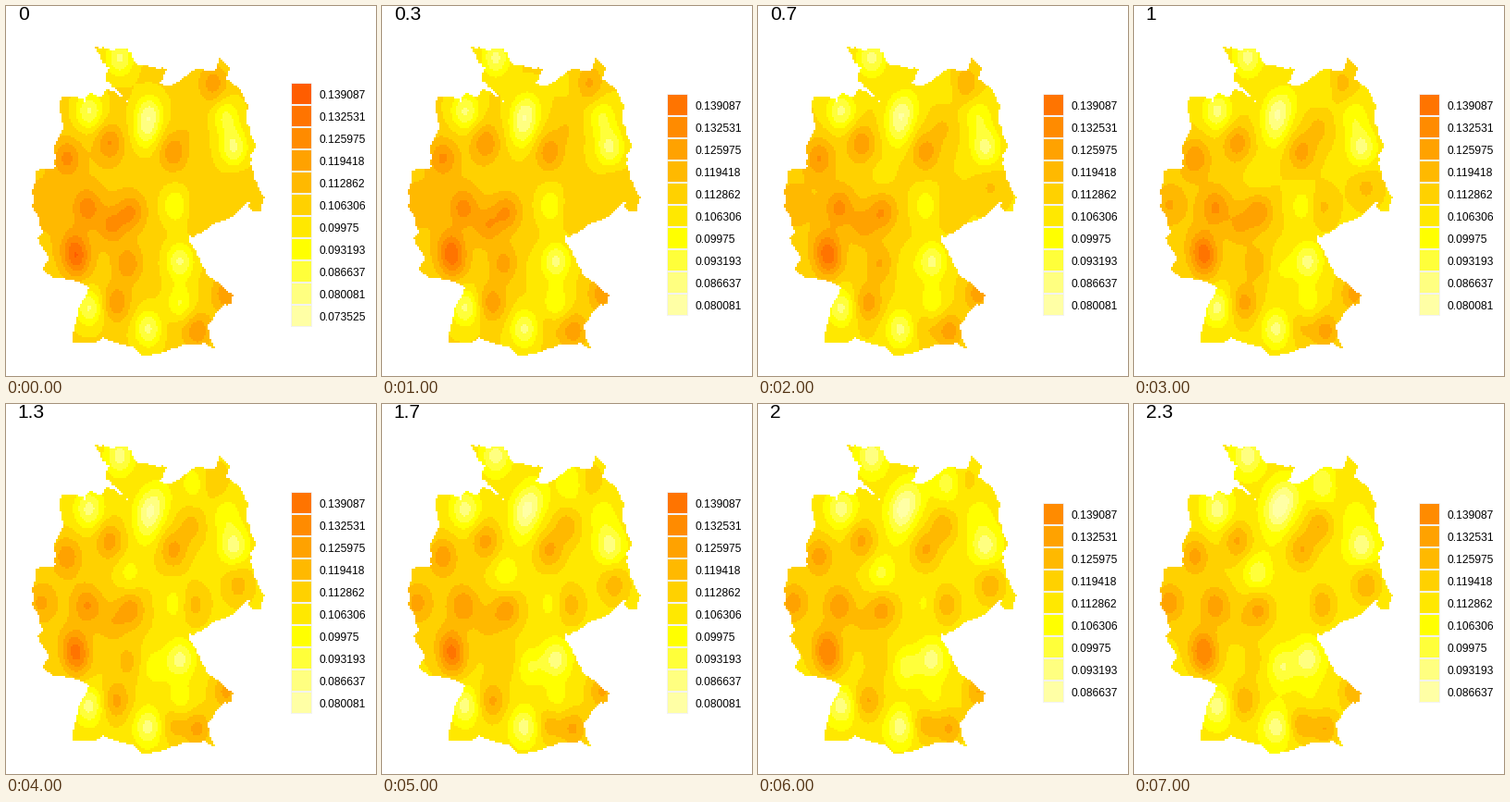
Write a matplotlib script that moves like this. It is 400 px wide and 400 px high and loops after 8000 ms.

```python
import numpy as np
import matplotlib.pyplot as plt
from matplotlib.animation import FuncAnimation
from matplotlib.patches import Rectangle
from matplotlib.path import Path

SIZE, DPI, CELL = 400, 100, 2
FRAMES = 8
TOP_VALUE, STEP = 0.139087, 0.00655622

# Heat palette from pale yellow (0) to deep orange (10)
PALETTE = [(255, 255, b) for b in (165, 128, 58)]
PALETTE += [(255, round(255 * (1 - i / 11)), 0) for i in range(8)]
PALETTE = np.array(PALETTE, dtype=np.uint8)

# Corners of the border, clockwise from the north-west
BORDER = [
    (96, 44), (118, 47), (132, 46), (139, 62), (160, 66), (173, 68),
    (166, 84), (181, 85), (207, 67), (226, 70), (231, 55), (242, 66),
    (237, 78), (254, 91), (262, 107), (259, 124), (270, 150), (264, 160),
    (268, 185), (279, 207), (275, 222), (266, 221), (262, 212), (248, 225),
    (222, 237), (202, 251), (198, 247), (197, 255), (209, 272), (216, 290),
    (245, 313), (244, 322), (233, 325), (218, 345), (225, 369), (215, 364),
    (178, 371), (148, 379), (140, 370), (105, 358), (95, 364), (72, 363),
    (78, 328), (90, 305), (78, 297), (52, 294), (40, 285), (46, 275),
    (35, 252), (40, 243), (28, 217), (33, 178), (52, 176), (53, 150),
    (63, 130), (58, 108), (61, 98), (77, 97), (87, 104), (91, 94),
    (104, 98), (110, 90), (131, 103), (115, 87), (108, 78), (112, 68),
    (104, 60)]

# Spots that share a strength: start, end, centres
SPOTS = [
    # steady warm and cold
    (2.6, 2.6, [(112, 148), (181, 158), (66, 164), (88, 218), (135, 223),
                (74, 261), (77, 277), (119, 321), (238, 311), (207, 351)]),
    (-3.4, -3.0, [(123, 56), (90, 114), (155, 116), (246, 153), (188, 276),
                  (90, 326), (154, 349)]),
    # warming and cooling
    (0.6, 2.6, [(38, 215), (203, 217), (251, 196), (181, 346), (200, 132)]),
    (2.4, 0.8, [(224, 84), (132, 279), (114, 238)]),
    (0.0, -2.4, [(160, 284), (205, 86), (165, 100), (133, 183)]),
    (-2.4, -0.6, [(151, 138), (183, 216), (188, 322), (238, 120)]),
]
SPREAD_X, SPREAD_Y = 10.5, 14


def rough_outline(points, rng, rounds=3):
    """Halve every side a few times, shaking the new points."""
    pts = np.array(points, float)
    for k in range(rounds):
        mid = (pts + np.roll(pts, -1, axis=0)) / 2
        mid += rng.uniform(-1.6, 1.6, mid.shape) / (1 + k / 2)
        pts = np.stack([pts, mid], axis=1).reshape(-1, 2)
    return pts


centres = (np.arange(SIZE // CELL) + .5) * CELL
X, Y = np.meshgrid(centres, centres)
outline = rough_outline(BORDER, np.random.default_rng(4))
LAND = Path(outline).contains_points(np.c_[X.ravel(), Y.ravel()])
LAND = LAND.reshape(X.shape)


def bump(x, y, sx, sy):
    return np.exp(-((X - x) / sx) ** 2 / 2 - ((Y - y) / sy) ** 2 / 2)


WEST = bump(60, 215, 60, 50)
FIELDS = [(start, end, sum(bump(x, y, SPREAD_X, SPREAD_Y) for x, y in spots))
          for start, end, spots in SPOTS]


def heat(t):
    """Palette level of every cell at time t from 0 to 1."""
    level = 4.7 - .9 * t + .9 * WEST
    for start, end, field in FIELDS:
        level = level + (start + (end - start) * t) * field
    return level


def top_level(frame):
    return 10 if frame == 0 else 9 if frame < 6 else 8


fig = plt.figure(figsize=(SIZE / DPI, SIZE / DPI), dpi=DPI, facecolor="white")
ax = fig.add_axes([0, 0, 1, 1])


def label(x, y, text, px):
    ax.text(x, y, text, fontsize=px * 72 / DPI, family="Liberation Sans",
            color="black", va="baseline")


def draw_legend(top):
    y0 = 215 - 12 * (top + 1)
    ax.add_patch(Rectangle((307.5, y0), 23.5, 24 * (top + 1),
                           fc="#f2f2f2", ec="none"))
    for i in range(top + 1):
        y = y0 + 24 * i
        ax.add_patch(Rectangle((308.5, y + 1), 21.5, 22,
                               fc=PALETTE[top - i] / 255, ec="none"))
        label(338.5, y + 17, f"{round(TOP_VALUE - STEP * i, 6):g}", 12)


def draw(frame):
    ax.clear()
    ax.axis("off")
    top = top_level(frame)
    levels = np.clip(np.rint(heat(frame / (FRAMES - 1))), 0, top).astype(int)
    image = np.full(X.shape + (3,), 255, np.uint8)
    image[LAND] = PALETTE[levels[LAND]]
    ax.imshow(image, extent=(0, SIZE, SIZE, 0), interpolation="nearest",
              aspect="auto")
    draw_legend(top)
    label(12.7, 15, f"{round(frame / 3, 1):g}", 21)
    ax.set_xlim(0, SIZE)
    ax.set_ylim(SIZE, 0)
    return []


anim = FuncAnimation(fig, draw, frames=FRAMES, interval=1000, repeat=True,
                     repeat_delay=0, init_func=lambda: [])
plt.show()
```
